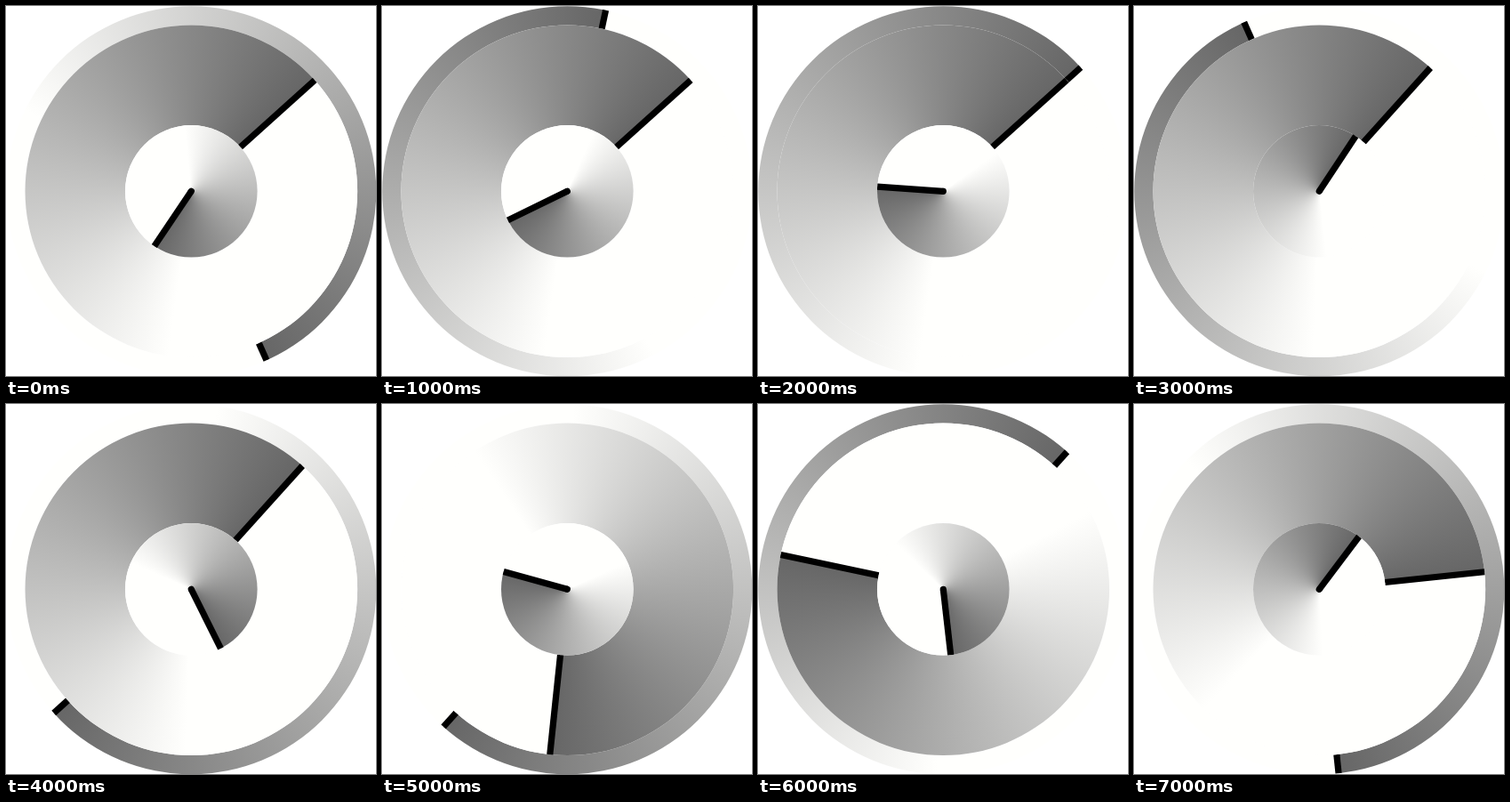
An HTML page with a canvas for the animation above (8000 ms loop, 416x416 px).

```html
<!DOCTYPE html>
<html lang="en">
<head>
<meta charset="utf-8">
<title>Polar clock</title>
<style>
  html, body { margin: 0; width: 100%; height: 100%; overflow: hidden; background: #fff; }
  canvas { display: block; }
</style>
</head>
<body>
<canvas id="clock" width="416" height="416"></canvas>
<script>
const ctx = document.getElementById('clock').getContext('2d');
const CENTER = 208.3, STEP = 1000;
const HAND = 7.2;
const FADE = 220 / 360; // share of a turn covered by the trail

// hours, minutes, seconds shown for one step each
const times = [
  [7, 8, 26], [8, 8, 2], [9, 8, 8], [1, 7, 56],
  [5, 7, 38], [9, 31, 37], [5, 47, 7], [1, 14, 29]
];

// A ring with a trail behind its hand; turn is clockwise from the top, 0 to 1.
function ring(inner, outer, turn) {
  const angle = (turn - 0.25) * 2 * Math.PI;
  const trail = ctx.createConicGradient(angle, CENTER, CENTER);
  trail.addColorStop(0, '#fffffd');
  trail.addColorStop(1 - FADE, '#fffffd');
  trail.addColorStop(1, '#666');
  ctx.fillStyle = trail;
  ctx.beginPath();
  ctx.arc(CENTER, CENTER, outer, 0, 2 * Math.PI);
  if (inner) {
    ctx.moveTo(CENTER + inner, CENTER);
    ctx.arc(CENTER, CENTER, inner, 0, 2 * Math.PI, true);
  }
  ctx.fill();

  ctx.save();
  ctx.translate(CENTER, CENTER);
  ctx.rotate(angle);
  ctx.fillStyle = '#000';
  ctx.fillRect(inner, -HAND / 2, outer - inner, HAND);
  if (!inner) {
    ctx.beginPath();
    ctx.arc(0, 0, HAND / 2, 0, 2 * Math.PI);
    ctx.fill();
  }
  ctx.restore();
}

function draw([h, m, s]) {
  ctx.clearRect(0, 0, 416, 416);
  ring(186.8, 208, s / 60);
  ring(74.3, 186.8, m / 60);
  ring(0, 74.3, (h + m / 60) / 12);
}

const start = performance.now();
let shown = -1;
function tick() {
  const i = Math.floor((performance.now() - start) / STEP) % times.length;
  if (i !== shown) draw(times[shown = i]);
  requestAnimationFrame(tick);
}
tick();
</script>
</body>
</html>
```
